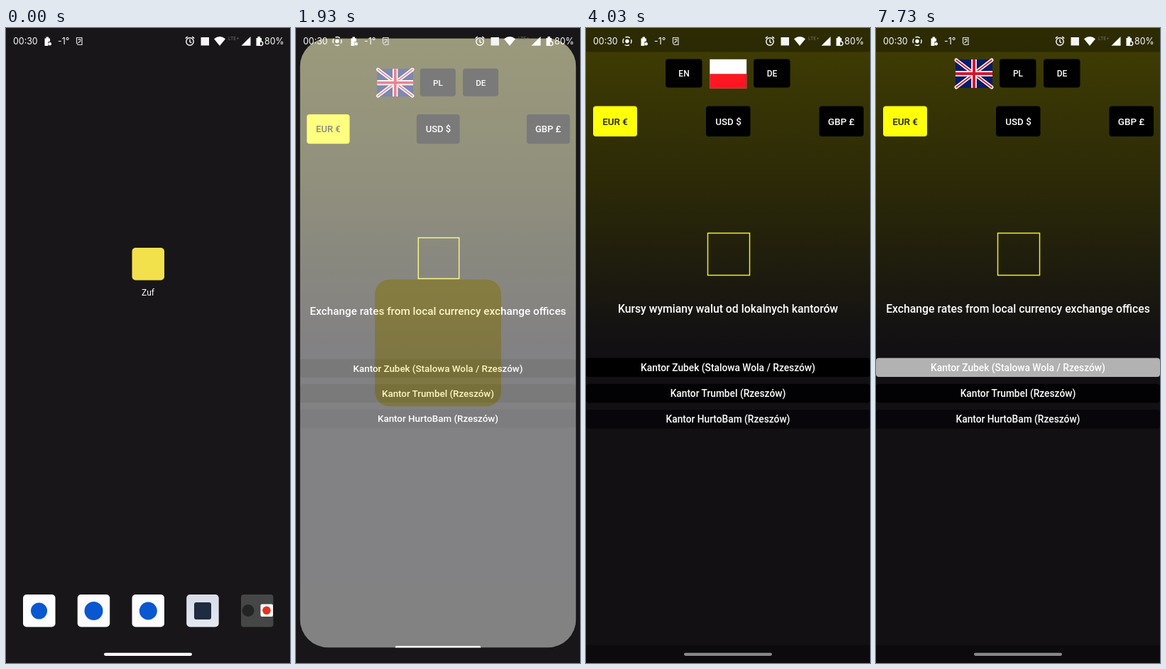
Animation, 400 px wide and 890 px high, one loop 8 s. Source, as an HTML page:

```html
<!DOCTYPE html>
<html lang="en">
<head>
<meta charset="utf-8">
<title>Currency app</title>
<style>
  html, body { margin: 0; width: 100%; height: 100%; overflow: hidden; background: #181618; }
  svg { display: block; width: 100vw; height: 100vh; }
  text { font-family: Roboto, "Liberation Sans", sans-serif; fill: #fff; }
  .mid { text-anchor: middle; }
  .tag { font-size: 15.75px; font-weight: 500; }
  .row { font-size: 13.75px; font-weight: 500; }
  .cur { font-size: 13.4px; font-weight: 500; }
  .lang { font-size: 12px; font-weight: 500; }
  .bar text { font-family: Inter, sans-serif; font-size: 12.4px; }
  .bar .net { font-size: 6.6px; fill: #777; }
</style>
</head>
<body>
<svg viewBox="0 0 400 890" preserveAspectRatio="none">
  <defs>
    <linearGradient id="olive" x1="0" y1="0" x2="0" y2="445" gradientUnits="userSpaceOnUse">
      <stop offset="0" stop-color="#413e03"/>
      <stop offset=".5" stop-color="#2b2907"/>
      <stop offset="1" stop-color="#121013"/>
    </linearGradient>
    <linearGradient id="cam" x1="0" y1="0" x2="0" y2="1">
      <stop offset="0" stop-color="#d8dce6"/>
      <stop offset="1" stop-color="#e4e8f2"/>
    </linearGradient>
    <clipPath id="clip"><rect id="hole"/></clipPath>
  </defs>

  <rect width="400" height="890" fill="#181618"/>

  <g id="home">
    <g id="launcher">
      <rect x="177.5" y="308" width="45.5" height="45.5" rx="5" fill="#f2e14b"/>
      <text class="mid" x="200" y="375" font-size="12">Zuf</text>
    </g>
    <g id="dock">
      <rect x="24" y="794" width="45.5" height="45.5" rx="5" fill="#fdfdff"/>
      <circle cx="46.5" cy="817" r="11.5" fill="#0b57d0"/>
      <rect x="100.7" y="794" width="45.5" height="45.5" rx="5" fill="#fdfdff"/>
      <circle cx="123.5" cy="817" r="13" fill="#0b57d0"/>
      <rect x="177.5" y="794" width="45.5" height="45.5" rx="5" fill="#fdfdff"/>
      <circle cx="200.3" cy="817" r="12.5" fill="#0b57d0"/>
      <rect x="254.2" y="794" width="45.5" height="45.5" rx="5" fill="url(#cam)"/>
      <rect x="265" y="805" width="24" height="24" rx="3" fill="#1f2b40"/>
      <rect x="331" y="794" width="45.5" height="45.5" rx="4" fill="#444746"/>
      <circle cx="341" cy="816.5" r="8.5" fill="#222524"/>
      <rect x="358.5" y="807.5" width="17.5" height="17.5" rx="2" fill="#fff"/>
      <circle cx="367" cy="816.3" r="5.8" fill="#e8321f"/>
    </g>
  </g>
  <rect id="homePill" x="138" y="875.7" width="124" height="4.2" rx="2.1" fill="#fff"/>

  <g id="window" clip-path="url(#clip)">
    <g id="app">
      <rect width="400" height="890" fill="#121013"/>
      <rect width="400" height="446" fill="url(#olive)"/>
      <g id="shade">
        <rect width="400" height="33.5" fill="#000" opacity=".3"/>
        <rect y="865" width="400" height="25" fill="#000" opacity=".35"/>
      </g>
      <g id="black"></g>
      <rect x="10" y="109.5" width="62" height="42.5" rx="4" fill="#ffff0a"/>
      <rect x="171.5" y="287.5" width="59" height="59" fill="none" stroke="#f4ee1c" stroke-width="1.5"/>
      <g id="words">
        <text class="mid cur" x="41" y="135.5" style="fill:#1a1a10">EUR €</text>
        <text class="mid cur" x="200.5" y="135.5">USD $</text>
        <text class="mid cur" x="359.5" y="135.5">GBP £</text>
        <text class="mid tag" id="tag" x="200" y="398.5"></text>
      </g>
      <g id="langs"></g>
      <rect id="appPill" x="138" y="875.7" width="124" height="4.2" rx="2.1"/>
      <rect id="veil" width="400" height="900" fill="#fff"/>
    </g>
    <g id="splash">
      <rect id="paper" fill="#fff"/>
      <rect id="mark" fill="#f6e65e"/>
    </g>
  </g>

  <g class="bar">
    <text x="10" y="23">00:30</text>
    <g id="record" fill="none" stroke="#fff" stroke-width="1.4">
      <circle cx="58" cy="18.5" r="6" stroke-dasharray="6.6 2.825" stroke-dashoffset="3.3"/>
      <circle cx="58" cy="18.5" r="2.7" fill="#fff" stroke="none"/>
    </g>
    <g id="notes">
      <path d="M54.5 14.5h2v-2h3.500v2h2v4.500h-2.500v6h-5z" fill="#fff"/>
      <circle cx="61.8" cy="22.3" r="2.2" fill="#fff"/>
      <text x="73" y="23">-1°</text>
      <path d="M99.5 13.5h7.500v10h-5.500l-2-2.500z" fill="none" stroke="#ddd" stroke-width="1.2"/>
      <path d="M101.5 16h4M101.5 21l4-3.500" stroke="#ddd" stroke-width="1.3"/>
    </g>
    <g fill="none" stroke="#fff" stroke-width="1.4">
      <circle cx="259" cy="19" r="5.2"/>
      <path d="M259 15.800v3.500l2.300 1.500M252.800 14.600l3-2.500M265.200 14.600l-3-2.500"/>
    </g>
    <rect x="274.5" y="13" width="11.5" height="11.5" fill="#f4f4f4"/>
    <path d="M293 15.300q8-6.800 16 0l-8 9.700z" fill="#fff"/>
    <text class="net" x="313" y="17">LTE+</text>
    <path d="M344.5 12v12.800h-13z" fill="#fff"/>
    <path d="M352.5 14h2v-2h3.500v2h2v4h-2v7h-5.500z" fill="#fff"/>
    <circle cx="359" cy="21.8" r="2.8" fill="none" stroke="#fff" stroke-width="1.3"/>
    <text x="364" y="23">80%</text>
  </g>
</svg>

<script>
const LOOP = 8000, OPEN = 1570, GREY = 178;
const $ = id => document.getElementById(id);
const clamp = v => Math.min(1, Math.max(0, v));
const span = (t, a, b) => clamp((t - a) / (b - a));
const mix = (a, b, p) => a + (b - a) * p;
const easeOut = p => 1 - (1 - p) ** 3;

function add(parent, tag, attrs, text) {
  const el = document.createElementNS('http://www.w3.org/2000/svg', tag);
  set(el, attrs);
  if (text) el.textContent = text;
  parent.appendChild(el);
  return el;
}
function set(el, attrs) {
  for (const k in attrs) el.setAttribute(k, attrs[k]);
}
const box = (x, y, width, height, rx) => ({ x, y, width, height, rx });
const grey = v => `rgb(${v},${v},${v})`;

const taglines = {
  EN: 'Exchange rates from local currency exchange offices',
  PL: 'Kursy wymiany walut od lokalnych kantorów',
  DE: 'Die Wechselkurse der örtlichen Wechselstuben an'
};
const flags = {
  EN: `<rect x="112" y="44" width="52" height="40" fill="#0a1c66"/>
    <g fill="none" stroke-linecap="round">
    <path d="M113 45L163 83M163 45L113 83" stroke="#fff" stroke-width="5"/>
    <path d="M113 45L163 83M163 45L113 83" stroke="#d8152f" stroke-width="1.7"/></g>
    <path d="M138 44v40M112 64h52" stroke="#fff" stroke-width="7.5"/>
    <path d="M138 44v40M112 64h52" stroke="#d8152f" stroke-width="4"/>`,
  PL: `<rect x="174" y="43.5" width="52.5" height="41.5" fill="#777"/>
    <rect x="174.5" y="44" width="51.5" height="20.5" fill="#fff"/>
    <rect x="174.5" y="64.5" width="51.5" height="20" fill="#ff1620"/>`,
  DE: `<rect x="235.7" y="43.5" width="52" height="13.5" fill="#000"/>
    <rect x="235.7" y="57" width="52" height="13.5" fill="#ff1a1f"/>
    <rect x="235.7" y="70.5" width="52" height="13" fill="#d2cc50"/>`
};

// Moments a language button is touched, and the next touch that releases it
const taps = [['PL', 3500, 4470], ['DE', 4470, 5470], ['EN', 5470, LOOP * 2]];
const SWITCH = 100, FADE = 500;

const black = $('black'), words = $('words');
const buttons = Object.keys(flags).map((name, i) => {
  const x = 112 + i * 62;
  const back = add(black, 'rect', box(x, 43.5, 51.5, 40, 4));
  const label = add($('langs'), 'text', { class: 'mid lang', x: x + 26, y: 68 }, name);
  const flag = add($('langs'), 'g', {});
  flag.innerHTML = flags[name];
  return { name, back, label, flag };
});
for (const x of [169, 328.5]) add(black, 'rect', box(x, 109.5, 62.5, 42.5, 4));
const rows = ['Kantor Zubek (Stalowa Wola / Rzeszów)', 'Kantor Trumbel (Rzeszów)', 'Kantor HurtoBam (Rzeszów)']
  .map((text, i) => {
    const y = 462.5 + i * 36.2;
    add(words, 'text', { class: 'mid row', x: 200, y: y + 18.3 }, text);
    return add(black, 'rect', { ...box(0, y, 400, 26.5, 4), fill: ['#000', '#020103', '#08060a'][i] });
  });

function drawStatus(t) {
  const p = easeOut(span(t, 30, 670));
  $('notes').setAttribute('transform', `translate(${23 * p} 0)`);
  $('record').setAttribute('opacity', span(t, 200, 600));
}

function drawOpening(t) {
  const opening = t >= OPEN, u = span(t, OPEN, OPEN + 700);
  const p = 1 - (1 - u) ** 4.78, q = 1 - (1 - u) ** 4.35;
  const mid = mix(330.75, 445, p);
  const x = mix(177.5, 0, p), w = mix(45.5, 400, p);
  const h = mix(45.5, 890, q), y = mid - h / 2;
  const r = mix(5, 46, p) * (1 - span(t, 1850, 2370) ** 1.2);
  const size = mix(45.5, 182, p);

  const zoom = mix(1, 0.97, p);
  $('home').setAttribute('transform', `translate(200 445) scale(${zoom}) translate(-200 -445)`);
  $('launcher').setAttribute('visibility', opening ? 'hidden' : 'visible');
  $('homePill').setAttribute('opacity', 1 - span(t, OPEN, OPEN + 130));

  $('window').setAttribute('visibility', opening ? 'visible' : 'hidden');
  set($('hole'), box(x, y, w, h, r));
  set($('paper'), box(x, y, w, h, 0));
  set($('mark'), box(x + w / 2 - size / 2, mid - size / 2, size, size, size * 0.115));
  $('app').setAttribute('transform', `translate(${x} ${y}) scale(${w / 400})`);
  $('splash').setAttribute('opacity', 1 - span(t, 1810, 2010));
  $('veil').setAttribute('opacity', 0.135 * (1 - span(t, 2030, 2350)));
  $('shade').setAttribute('opacity', span(t, 2040, 2350));
}

function drawApp(t) {
  let lang = 'EN';
  const glow = { EN: 0, PL: 0, DE: 0 };
  for (const [name, down, up] of taps) {
    if (t >= down + SWITCH) lang = name;
    glow[name] = easeOut(span(t, down, down + FADE)) * (1 - easeOut(span(t, up, up + FADE)));
  }
  for (const b of buttons) {
    const on = b.name === lang;
    b.flag.setAttribute('display', on ? 'inline' : 'none');
    b.label.setAttribute('display', on ? 'none' : 'inline');
    b.back.setAttribute('display', on ? 'none' : 'inline');
    b.back.setAttribute('fill', grey(GREY * glow[b.name]));
  }
  if ($('tag').textContent !== taglines[lang]) $('tag').textContent = taglines[lang];
  rows[0].setAttribute('fill', grey(GREY * easeOut(span(t, 7200, 7730))));
  $('appPill').setAttribute('fill', grey(mix(255, 136, span(t, 2700, 3200))));
}

function draw(t) {
  drawStatus(t);
  drawOpening(t);
  drawApp(t);
}

const start = performance.now();
function tick() {
  draw((performance.now() - start) % LOOP);
  requestAnimationFrame(tick);
}
draw(0);
requestAnimationFrame(tick);
</script>
</body>
</html>
```
